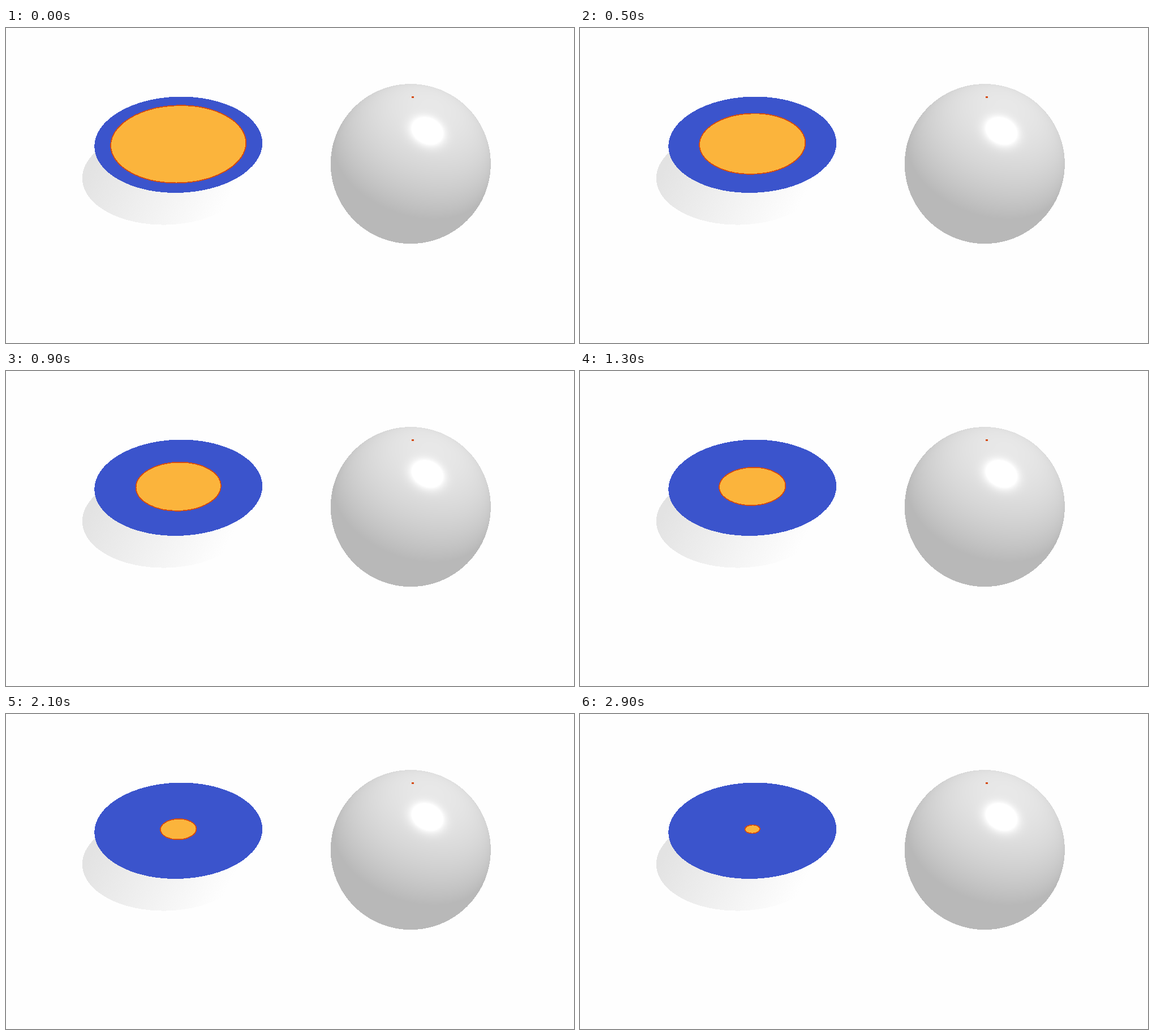
Write an HTML page with a canvas that moves like this. It is 1004 px wide and 558 px high and loops after 3000 ms.

```html
<!DOCTYPE html>
<html lang="en">
<head>
<meta charset="utf-8">
<title>Shrinking disc and sphere</title>
<style>
  html, body { margin: 0; width: 100%; height: 100%; overflow: hidden; background: #fefefe; }
  canvas, svg { position: absolute; left: 0; top: 0; display: block; }
</style>
</head>
<body>
<canvas id="ball" width="1004" height="558"></canvas>
<svg width="1004" height="558" viewBox="0 0 1004 558" shape-rendering="crispEdges">
  <defs>
    <linearGradient id="shade" gradientUnits="userSpaceOnUse" x1="150" y1="245" x2="358" y2="366">
      <stop offset="0" stop-color="#e3e3e3"/>
      <stop offset="1" stop-color="#fefefe"/>
    </linearGradient>
  </defs>
  <ellipse cx="283" cy="263.3" rx="148.3" ry="85.2" transform="rotate(-1.6 283 263.3)" fill="url(#shade)"/>
  <circle id="plate" fill="#3b54cc"/>
  <circle id="disc" fill="#fbb43c" stroke="#d44a10" stroke-width="1.8" vector-effect="non-scaling-stroke"/>
  <circle cx="719" cy="122.5" r="2" fill="#d44a10"/>
</svg>
<script>
const LOOP = 3000, STEP = 100, PLATE_R = 148.5;
const plate = document.getElementById('plate');
const disc = document.getElementById('disc');

// Places a circle on the tilted plane; its centre drops with size due to perspective.
function layFlat(el, r) {
  const cy = 204 + 2.8 * (r / PLATE_R) ** 2;
  el.setAttribute('r', r);
  el.setAttribute('transform', `matrix(1 -0.0193 0 0.5734 304.7 ${cy})`);
}

function drawBall(cx, cy, radius) {
  const ctx = document.getElementById('ball').getContext('2d');
  const size = Math.ceil(radius * 2) + 2;
  const left = Math.floor(cx - radius), top = Math.floor(cy - radius);
  const img = ctx.createImageData(size, size);
  const light = [0.28, -0.72, 0.635];
  const shine = [0.376, -0.732, 0.57];
  const dot = (v, x, y, z) => v[0] * x + v[1] * y + v[2] * z;
  for (let j = 0; j < size; j++) {
    for (let i = 0; i < size; i++) {
      const x = (left + i + 0.5 - cx) / radius;
      const y = (top + j + 0.5 - cy) / radius;
      const d = x * x + y * y;
      if (d > 1) continue;
      const z = Math.sqrt(1 - d);
      const diffuse = Math.max(0, dot(light, x, y, z));
      const mirror = Math.max(0, 2 * dot(shine, x, y, z) * z - shine[2]);
      const grey = Math.min(255, 184 + 48 * diffuse + 100 * mirror ** 20);
      const k = (j * size + i) * 4;
      img.data[k] = img.data[k + 1] = img.data[k + 2] = grey;
      img.data[k + 3] = 255;
    }
  }
  ctx.putImageData(img, left, top);
}

function render(ms) {
  const n = Math.floor((ms % LOOP) / STEP);
  layFlat(disc, (10.935 - 0.252 * n) ** 2);
}

drawBall(715.3, 240.6, 141.5);
layFlat(plate, PLATE_R);
render(0);

const start = performance.now();
function tick() {
  render(performance.now() - start);
  requestAnimationFrame(tick);
}
requestAnimationFrame(tick);
</script>
</body>
</html>
```
